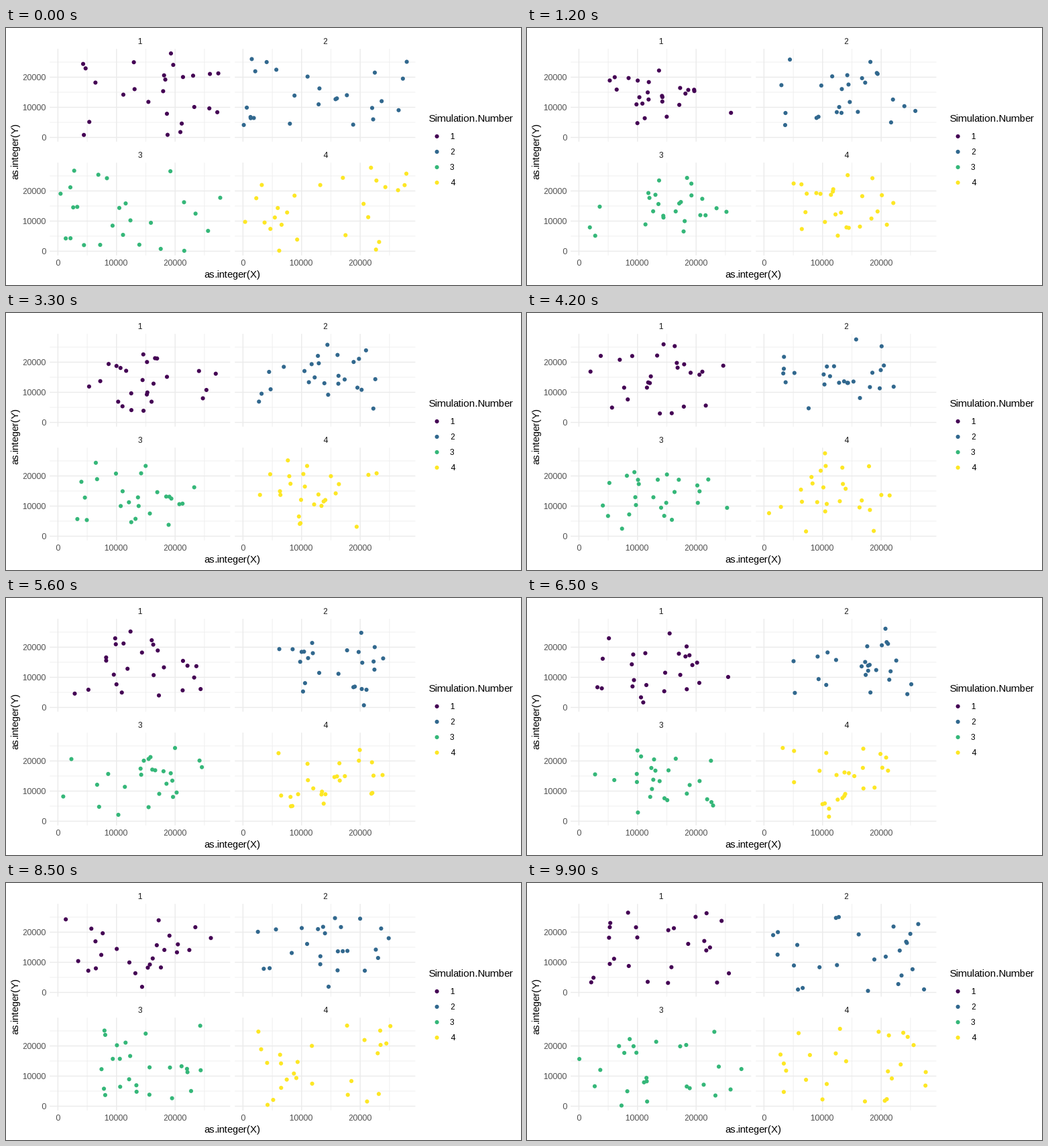
Animation, 768 px wide and 384 px high, one loop 10000 ms. Source, as a matplotlib script:

```python
import matplotlib.pyplot as plt
import numpy as np
from matplotlib.animation import FuncAnimation

W, H, DPI = 768, 384, 96
FRAMES, INTERVAL = 100, 100
STATES, POINTS, SPAN = 14, 25, 28000
SCALE = np.array([87.4, -45]) / 10000   # pixels per data unit
PANEL_W, PANEL_H = np.abs(SPAN * 1.1 * SCALE)
ORIGINS = [(77.4, 163.5), (353.4, 163.5), (77.4, 333.5), (353.4, 333.5)]
COLORS = ["#440154", "#31688e", "#35b779", "#fde725"]
GRID, TICK, STRIP = "#ebebeb", "#4d4d4d", "#1a1a1a"
SMALL, LARGE = 8.8, 11
DOT = dict(s=4.6 ** 2, linewidths=0, zorder=3)

plt.rcParams.update({
    "font.family": "Liberation Sans",
    "text.hinting": "force_autohint",
    "text.hinting_factor": 1,
})

fig = plt.figure(figsize=(W / DPI, H / DPI), dpi=DPI, facecolor="white")
ax = fig.add_axes([0, 0, 1, 1])
ax.set(xlim=(0, W), ylim=(H, 0))
ax.axis("off")


def label(x, y, text, size=SMALL, color="black", ha="center", rotation=0):
    ax.text(x, y, text, size=size, color=color, ha=ha, va="baseline",
            rotation=rotation, rotation_mode="anchor")


def line(xs, ys, width, z):
    ax.plot(xs, ys, color=GRID, lw=width, zorder=z, snap=False,
            solid_capstyle="butt")


def draw_panel(number, x0, y0):
    left, bottom = (x0, y0) - SPAN * 0.05 * SCALE
    right, top = left + PANEL_W, bottom - PANEL_H
    for value in range(0, 30000, 5000):
        major = value % 10000 == 0
        width, z = (1.07, 2) if major else (0.53, 1)
        x, y = (x0, y0) + value * SCALE
        line([x, x], [top, bottom], width, z)
        line([left, right], [y, y], width, z)
        if major and number > 2:
            label(x - 0.5, 355, str(value), color=TICK)
        if major and number % 2:
            label(59.5, y + 4.5, str(value), color=TICK, ha="right")
    label((left + right) / 2, top - 7, str(number), color=STRIP)


def draw_legend():
    label(631, 140, "Simulation.Number", LARGE, ha="left")
    ys = 161.9 + 23.04 * np.arange(len(COLORS))
    ax.scatter([642.6] * len(ys), ys, c=COLORS, **DOT)
    for i, y in enumerate(ys):
        label(662, y + 4, str(i + 1), ha="left")


for i, origin in enumerate(ORIGINS):
    draw_panel(i + 1, *origin)
draw_legend()
label(337.5, 373, "as.integer(X)", LARGE)
label(18, 184, "as.integer(Y)", LARGE, rotation=90)

# Every dot glides linearly from one random state to the next.
rng = np.random.default_rng(14)
values = rng.uniform(0, SPAN, (STATES, len(ORIGINS), POINTS, 2))
states = np.array(ORIGINS)[:, None] + values * SCALE
keys = np.linspace(0, FRAMES - 1, STATES).round()
dots = ax.scatter(*states[0].reshape(-1, 2).T, c=np.repeat(COLORS, POINTS),
                  **DOT)


def update(frame):
    leg = min(np.searchsorted(keys, frame, side="right") - 1, STATES - 2)
    t = (frame - keys[leg]) / (keys[leg + 1] - keys[leg])
    now = (1 - t) * states[leg] + t * states[leg + 1]
    dots.set_offsets(now.reshape(-1, 2))
    return [dots]


anim = FuncAnimation(fig, update, frames=FRAMES, interval=INTERVAL,
                     repeat=True, repeat_delay=0)
plt.show()
```
